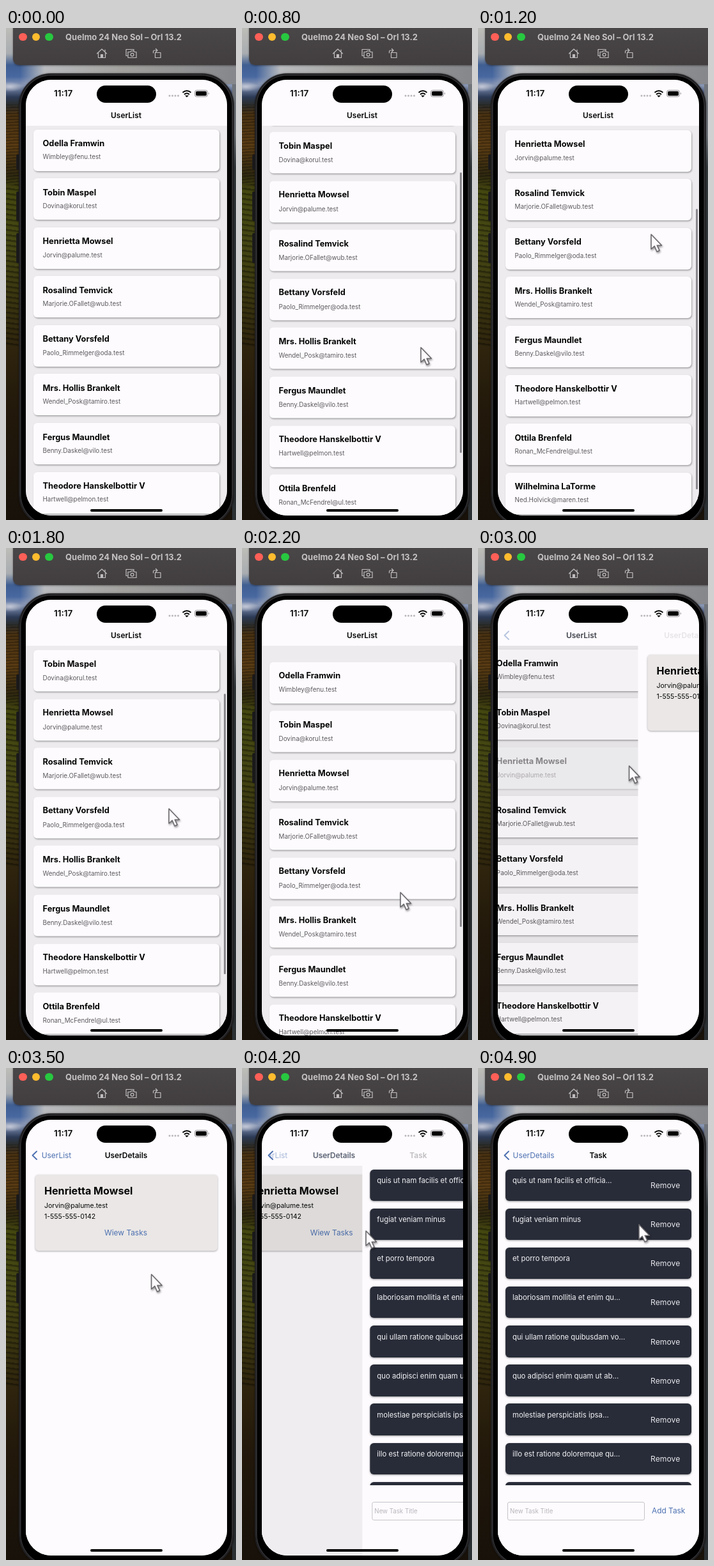
Write an HTML page that moves like this. It is 360 px wide and 770 px high and loops after 5 s.

```html
<!DOCTYPE html>
<html lang="en">
<head>
<meta charset="utf-8">
<title>User list demo</title>
<style>
html, body { margin: 0; width: 100%; height: 100%; overflow: hidden; }
#stage { position: relative; width: 360px; height: 770px; overflow: hidden; background: #14100a;
  font-family: Inter, Roboto, sans-serif; color: #050505; }
#stage div, #stage svg { position: absolute; box-sizing: border-box; }
.text { white-space: nowrap; line-height: 1; transform: translateY(-50%); }
.wallpaper { inset: 0; background:
  linear-gradient(90deg, #b9bbbe00 22px, #b9bbbe 60px, #a3a29f 180px, #85878b) 0 54px / 360px 34px no-repeat,
  linear-gradient(#70757b 80px, #343a3c 130px, #2b3033) 354px 88px / 6px 682px no-repeat,
  radial-gradient(ellipse 20px 8px at 6px 92px, #d3d6e0cc, #d3d6e000),
  repeating-linear-gradient(8deg, #0000 0 4px, #0005 6px 8px) 0 245px / 360px 255px no-repeat,
  repeating-radial-gradient(ellipse at 30px 170px, #0000 0 4px, #0004 6px 9px) 0 120px / 360px 125px no-repeat,
  linear-gradient(#bdbcb8, #a9adb0 40px, #3f5e92 58px, #4767a0 76px, #8b98b4 90px, #5d6c8c 98px, #2c3a55 108px,
    #2b2d2c 120px, #4a3212 135px, #5a3c13 185px, #2f2810 230px, #44470f 255px, #454714 340px,
    #3a3610 420px, #2f240d 500px, #22180b 600px, #17110a 770px); }
.toolbar { left: 11px; top: -10px; width: 360px; height: 68px; border-radius: 9px;
  background: linear-gradient(#4b4849, #423e3f); box-shadow: 0 1px 3px #0006; }
.light { width: 12.6px; height: 12.6px; border-radius: 50%; top: 7.7px; }
.wintitle { font-size: 13px; font-weight: 700; color: #c5c2c4; }
.button { left: 16px; width: 5px; background: #1c1b1c; border-radius: 2px; }
.phone { left: 20px; top: 71px; width: 337px; height: 710px; border-radius: 51px;
  background: #000; border: 2px solid #222123; box-shadow: inset 0 0 0 1.5px #363538, 0 0 3px #0008; }
.screen { inset: 0; clip-path: inset(81px 14px 7px 31px round 40px); background: #fdfbfe; }
.nav { left: 31px; top: 81px; width: 315px; height: 72.5px; background: #fdfbfe; border-bottom: 1px solid #d6d4d8; }
.pane { left: 31px; top: 153px; width: 315px; height: 610px; overflow: hidden; background: #fdfbfe; }
.list { background: #edebee; }
.scroller { inset: 0; }
.dim { inset: 0; background: #000; }
.card { left: 12px; width: 291px; height: 65px; border-radius: 6px; background: #fdfbfe; box-shadow: 1px 1.5px 2.5px #0005; }
.name { font-size: 12.8px; font-weight: 700; }
.mail { font-size: 9.9px; color: #5c5a5e; }
.detail { left: 15px; top: 14px; width: 285px; height: 119px; border-radius: 5px; background: #eae7e6; box-shadow: 0 1px 3px #0005; }
.bigname { font-size: 16.1px; font-weight: 700; }
.info { font-size: 10.5px; }
.link { font-size: 11.9px; color: #4c70b0; }
.tasks { left: 0; top: 0; width: 315px; height: 500px; overflow: hidden; }
.task { left: 12px; width: 291px; height: 49.5px; border-radius: 6px; background: #282c38; box-shadow: 0 1px 3px #0006; }
.task .text { color: #f4f3f6; font-size: 11.3px; }
.task .remove { font-size: 12.2px; color: #e6e5ea; }
.input { left: 14.5px; top: 525.5px; width: 215px; height: 29.5px; border: 1px solid #c6c4c9; border-radius: 3px; }
.hint { font-size: 9.7px; color: #b8b6bb; }
.bar { left: 341px; width: 2.5px; border-radius: 2px; background: #89878c; }
.title, .back { top: 136.5px; left: 0; white-space: nowrap; line-height: 1; font-size: 11.9px; }
.title { font-weight: 600; }
.back { color: #4c70b0; }
.backclip { left: 0; top: 0; width: 360px; height: 160px; clip-path: inset(0 0 0 43px); }
.clock { font-size: 13.5px; font-weight: 600; }
.island { left: 142px; top: 89.5px; width: 92.5px; height: 27px; border-radius: 14px; background: #000; }
.home { left: 132px; top: 753px; width: 113px; height: 4px; border-radius: 2px; background: #000; }
.cursor { left: 0; top: 0; overflow: visible; filter: drop-shadow(1px 2px 1.5px #0006); }
</style>
</head>
<body>
<div id="stage"></div>
<script>
const stage = document.getElementById('stage');
const users = [
  ['Odella Framwin', 'Wimbley@fenu.test'],
  ['Tobin Maspel', 'Dovina@korul.test'],
  ['Henrietta Mowsel', 'Jorvin@palume.test'],
  ['Rosalind Temvick', 'Marjorie.OFallet@wub.test'],
  ['Bettany Vorsfeld', 'Paolo_Rimmelger@oda.test'],
  ['Mrs. Hollis Brankelt', 'Wendel_Posk@tamiro.test'],
  ['Fergus Maundlet', 'Benny.Daskel@vilo.test'],
  ['Theodore Hanskelbottir V', 'Hartwell@pelmon.test'],
  ['Ottila Brenfeld', 'Ronan_McFendrel@ul.test'],
  ['Wilhelmina LaTorme', 'Ned.Holvick@maren.test']
];
const tasks = ['quis ut nam facilis et officia...', 'fugiat veniam minus', 'et porro tempora',
  'laboriosam mollitia et enim qu...', 'qui ullam ratione quibusdam vo...', 'quo adipisci enim quam ut ab...',
  'molestiae perspiciatis ipsa...', 'illo est ratione doloremque qu...', ''];

function box(parent, cls, style = {}) {
  const el = document.createElement('div');
  el.className = cls;
  Object.assign(el.style, style);
  return parent.appendChild(el);
}
function text(parent, cls, x, y, value) {
  const el = box(parent, 'text ' + cls, { left: x + 'px', top: y + 'px' });
  el.textContent = value;
  return el;
}
function svg(parent, cls, content) {
  parent.insertAdjacentHTML('beforeend',
    `<svg class="${cls}" style="left:0;top:0" width="360" height="160" fill="none">${content}</svg>`);
  return parent.lastElementChild;
}
function label(parent, cls, value) {
  const el = box(parent, cls);
  el.textContent = value;
  return el;
}

// Desktop, window bar and device
box(stage, 'wallpaper');
box(stage, 'toolbar');
['#fe5f57', '#febc2e', '#28c840'].forEach((background, i) =>
  box(stage, 'light', { left: 20.2 + 20.5 * i + 'px', background }));
text(stage, 'wintitle', 93, 14, 'Quelmo 24 Neo Sol – Orl 13.2');
svg(stage, '', `<g stroke="#bfbcbe" stroke-width="1.2" stroke-linejoin="round" stroke-linecap="round">
  <path d="M142.5 40 150 33 157.500 40M144.500 39V46.500H155.500V39M155 34V36.500"/>
  <path d="M148.500 46V41.500H151.500V46Z" fill="#bfbcbe"/>
  <path d="M190.500 43.500H188V33.500H200V35.500"/>
  <path d="M191 37.500H194.500L196 35.800H199.500L201 37.500H204V46.500H191Z"/><circle cx="197.600" cy="41.700" r="2.400"/>
  <path d="M233.500 38.500H242V46.500H233.500ZM230.500 39V37Q230.500 35 232.500 35H237M234.500 32.500 237 35 234.500 37.500"/></g>`);
[[198, 24], [256, 46], [321, 47]].forEach(([top, height]) =>
  box(stage, 'button', { top: top + 'px', height: height + 'px' }));
box(stage, 'phone');

const screen = box(stage, 'screen');
box(screen, 'nav');

// User list
const listPane = box(screen, 'pane list');
const scroller = box(listPane, 'scroller');
const cards = users.map(([name, mail], i) => {
  const card = box(scroller, 'card', { top: 5.7 + 76.55 * i + 'px' });
  text(card, 'name', 14.5, 22.5, name);
  text(card, 'mail', 14.5, 43.8, mail);
  return card;
});
const listDim = box(listPane, 'dim');
const bar = box(screen, 'bar');

// User details
const detailPane = box(screen, 'pane');
const detail = box(detailPane, 'detail');
text(detail, 'bigname', 14, 25, users[2][0]);
text(detail, 'info', 14, 49, users[2][1]);
text(detail, 'info', 14, 66, '1-555-555-0142');
const viewLink = text(detail, 'link', 108, 90.5, 'Wiew Tasks');
const detailDim = box(detailPane, 'dim');

// Tasks
const taskPane = box(screen, 'pane');
const taskList = box(taskPane, 'tasks');
tasks.forEach((value, i) => {
  const task = box(taskList, 'task', { top: 5.5 + 61.15 * i + 'px' });
  text(task, '', 11, 18.5, value);
  text(task, 'remove', 227, 25.5, 'Remove');
});
box(taskPane, 'input');
text(taskPane, 'hint', 19, 540.5, 'New Task Title');
text(taskPane, 'link', 241, 540, 'Add Task');

// Navigation bar and status bar
const chevron = svg(screen, '', '<path d="M48 130.500 41.500 136.800 48 143" stroke="#4c70b0" stroke-width="1.900" stroke-linecap="round" stroke-linejoin="round"/>');
const backClip = box(screen, 'backclip');
const listTitle = label(screen, 'title', 'UserList');
const listBack = label(backClip, 'back', 'UserList');
const detailTitle = label(screen, 'title', 'UserDetails');
const detailBack = label(backClip, 'back', 'UserDetails');
const taskTitle = label(screen, 'title', 'Task');
text(screen, 'clock', 75, 102.8, '11:17');
box(screen, 'island');
svg(screen, '', `<g fill="#b9b7bb">${[256, 260.5, 265, 269.5].map(x => `<circle cx="${x}" cy="106" r="1.500"/>`).join('')}</g>
  <g stroke="#000" stroke-width="2"><path d="M276.500 101Q283 95.500 289.500 101M279 104Q283 100.500 287 104"/>
  <path d="M281.800 106.300H284.200L283 107.500Z" stroke-width="1.500"/></g>
  <rect x="295.500" y="97.500" width="20" height="10" rx="3" stroke="#8a888c"/>
  <rect x="297" y="99" width="17" height="7" rx="1.800" fill="#000"/>
  <path d="M317 101Q319 102.500 317 104Z" fill="#8a888c"/>`);
box(screen, 'home');

const cursor = svg(stage, 'cursor', `<path d="M0 0V23L5.200 18.300 9 27 13 25.200 9.300 17.200H16.500Z"
  fill="#fdfbfe" stroke="#6b696d" stroke-width="1.600" stroke-linejoin="round"/>`);

const scrollKeys = [[500, 0], [700, 30], [900, 115], [1000, 160], [1100, 157], [1200, 152], [1500, 152], [1800, 75.5],
  [2000, 18], [2100, -8], [2200, -19.5], [2300, -21], [2400, -8], [2500, -2], [2600, 0]];
const cursorKeys = [[500, 285, 600], [800, 280, 500], [1100, 271, 323], [1500, 271, 323], [1800, 255, 408],
  [2200, 248, 539], [2300, 247, 545], [2700, 237, 342], [3400, 236, 340], [3900, 194, 255],
  [4200, 194, 255], [4600, 225, 250], [4900, 252, 245]];

const clamp = (v, lo, hi) => Math.min(hi, Math.max(lo, v));
function tween(keys, t, n = 1) {
  if (t <= keys[0][0]) return keys[0][n];
  const i = keys.findIndex(k => k[0] >= t);
  if (i < 0) return keys[keys.length - 1][n];
  const a = keys[i - 1], b = keys[i];
  return a[n] + (b[n] - a[n]) * (t - a[0]) / (b[0] - a[0]);
}
// Critically damped spring of a screen push
function push(t, start) {
  const d = Math.max(0, (t - start) * 0.014);
  return d > 8 ? 1 : 1 - (1 + d) * Math.exp(-d);
}
const slide = (el, x) => el.style.transform = `translateX(${x}px)`;
function place(el, center, opacity) {
  el.style.transform = `translate(${center}px) translate(-50%, -50%)`;
  el.style.opacity = opacity;
}

function draw(t) {
  const p = push(t, 2921), q = push(t, 4080);
  const pLag = p ** 1.2, qLag = q ** 1.2;

  const scroll = tween(scrollKeys, t), inside = clamp(scroll, 0, 152);
  scroller.style.transform = `translateY(${-scroll}px)`;
  bar.style.top = 173.6 + 0.719 * inside + Math.max(0, scroll - 152) + 'px';
  bar.style.height = 439 - Math.abs(scroll - inside) + 'px';
  bar.style.opacity = tween([[500, 0], [600, 1], [2600, 1], [2800, 0]], t);

  slide(listPane, -94.5 * p);
  slide(detailPane, 315 * (1 - p) - 94.5 * q);
  slide(taskPane, 315 * (1 - q));
  listDim.style.opacity = 0.11 * p;
  detailDim.style.opacity = 0.11 * q;
  cards[2].style.opacity = tween([[2700, 1], [2800, 0.3], [2900, 0.2], [3000, 0.42], [3200, 1]], t);
  viewLink.style.opacity = tween([[3900, 1], [4000, 0.3], [4200, 1]], t);

  chevron.style.opacity = Math.min(1, p * 1.3);
  place(listTitle, 188 - 109 * pLag, 1 - p);
  place(listBack, 188 - 109 * pLag - 62 * q, p * (1 - q));
  place(detailTitle, 188 + 196 * (1 - p) - 101 * qLag, p * p * (1 - q));
  place(detailBack, 188 - 101 * qLag, q);
  place(taskTitle, 188 + 176 * (1 - q), q * q);

  cursor.style.display = t < 500 ? 'none' : 'block';
  cursor.style.transform = `translate(${tween(cursorKeys, t, 1)}px, ${tween(cursorKeys, t, 2)}px)`;
}

function frame() {
  draw(Math.floor(performance.now() % 5000 / 100) * 100);
  requestAnimationFrame(frame);
}
frame();
</script>
</body>
</html>
```
